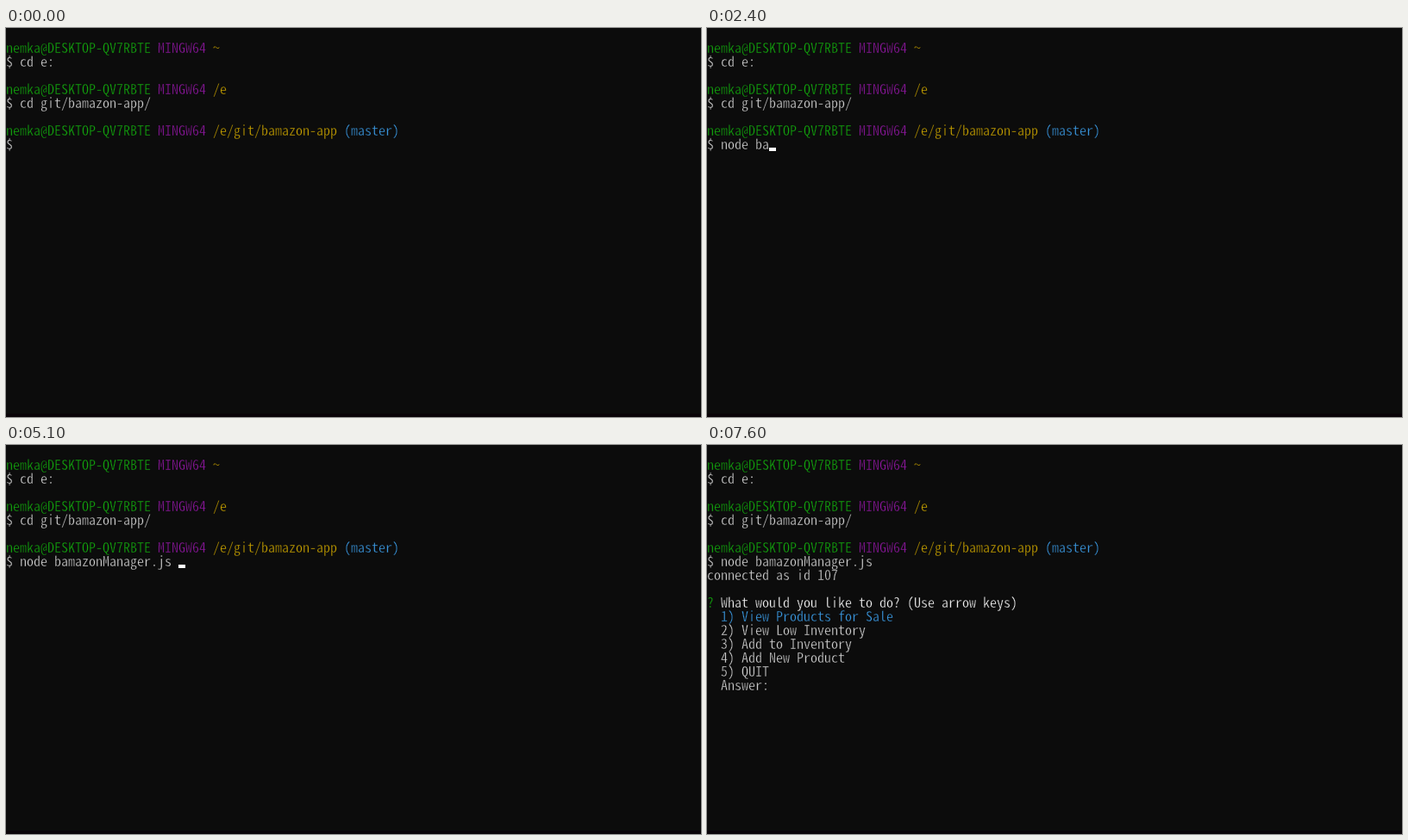
Animation of 806x452 px, one loop 8000 ms. Source, as an HTML page with a canvas:

```html
<!DOCTYPE html>
<html lang="en">
<head>
<meta charset="utf-8">
<title>Terminal session</title>
<style>
html, body { margin: 0; width: 806px; height: 452px; overflow: hidden; background: #0c0c0c; }
canvas { display: block; }
</style>
</head>
<body>
<canvas id="screen" width="806" height="452"></canvas>
<script>
const ctx = document.getElementById('screen').getContext('2d');
const LOOP = 8000, SAMPLE = 100, CELL = 8, ROW = 16, BASELINE = 13;
const BACK = '#0c0c0c', GREEN = '#13a10e', PURPLE = '#881798', YELLOW = '#c19c00',
      BLUE = '#3a96dd', GREY = '#cccccc', WHITE = '#f2f2f2';

// Pick the size at which one character fills one cell
const face = '"Noto Sans Mono CJK KR", "Noto Sans Mono CJK JP", "Noto Sans Mono CJK SC", "Liberation Mono", monospace';
const fontAt = size => `300 ${size}px ${face}`;
ctx.font = fontAt(100);
const font = fontAt(CELL * 100 / ctx.measureText('M').width);

const PROMPT_ROW = 8, ENTER = 5850, MENU = 7250;
const BLINK_START = 840, BLINK = 487;

// Bursts of typing: text, start, time between keys
const keys = [['node ba', 1325, 180], ['mazon', 3060, 53], ['M', 4750, 0], ['anager.js ', 5150, 0]]
  .flatMap(([text, start, gap]) => [...text].map((ch, i) => ({ ch, time: start + i * gap })));

const blinks = t => Math.floor((t - BLINK_START) / BLINK);

// Any key or output shows the cursor; every blink toggles it
function cursorOn(t) {
  const times = [BLINK_START, ...keys.map(key => key.time), ENTER, MENU];
  const last = Math.max(...times.filter(time => time <= t));
  return (blinks(t) - blinks(last)) % 2 === 0;
}

function write(row, ...runs) {
  let col = 0;
  for (const [text, color] of runs) {
    ctx.fillStyle = color;
    for (const ch of text) {
      const x = CELL * col++, y = ROW * row + BASELINE;
      ctx.fillText(ch, x, y);
      ctx.strokeText(ch, x, y); // a background outline thins the strokes
    }
  }
}

function prompt(row, path, branch = '') {
  write(row, ['nemka@DESKTOP-QV7RBTE ', GREEN], ['MINGW64 ', PURPLE], [path, YELLOW], [branch, BLUE]);
}

function menu() {
  write(9, ['connected as id 107', GREY]);
  write(11, ['? ', GREEN], ['What would you like to do? (Use arrow keys)', WHITE]);
  ['View Products for Sale', 'View Low Inventory', 'Add to Inventory', 'Add New Product', 'QUIT']
    .forEach((item, i) => write(12 + i, [`  ${i + 1}) ${item}`, i ? GREY : BLUE]));
  write(17, ['  Answer: ', GREY]);
}

function draw(t) {
  ctx.fillStyle = BACK;
  ctx.fillRect(0, 0, 806, 452);
  ctx.fillStyle = '#0a0408';
  ctx.fillRect(0, 448, 806, 4);
  ctx.font = font;
  ctx.strokeStyle = BACK;
  ctx.lineWidth = 0.3;
  ctx.lineJoin = 'round';

  prompt(1, '~');
  write(2, ['$ cd e:', GREY]);
  prompt(4, '/e');
  write(5, ['$ cd git/bamazon-app/', GREY]);
  prompt(7, '/e/git/bamazon-app', ' (master)');

  const typed = keys.filter(key => key.time <= t).map(key => key.ch).join('');
  write(PROMPT_ROW, ['$ ' + typed, GREY]);
  if (t >= MENU) menu();

  if (cursorOn(t)) {
    const [col, row] = t >= MENU ? [10, 17] : t >= ENTER ? [0, 9] : [2 + typed.length, PROMPT_ROW];
    ctx.fillStyle = '#ffffff';
    ctx.fillRect(col * CELL, row * ROW + 11, CELL, 4);
  }
}

// The screen refreshes ten times a second, showing all that happens in each step
function tick() {
  const step = Math.floor(performance.now() % LOOP / SAMPLE);
  draw((step + 1) * SAMPLE - 1);
  requestAnimationFrame(tick);
}
tick();
</script>
</body>
</html>
```
